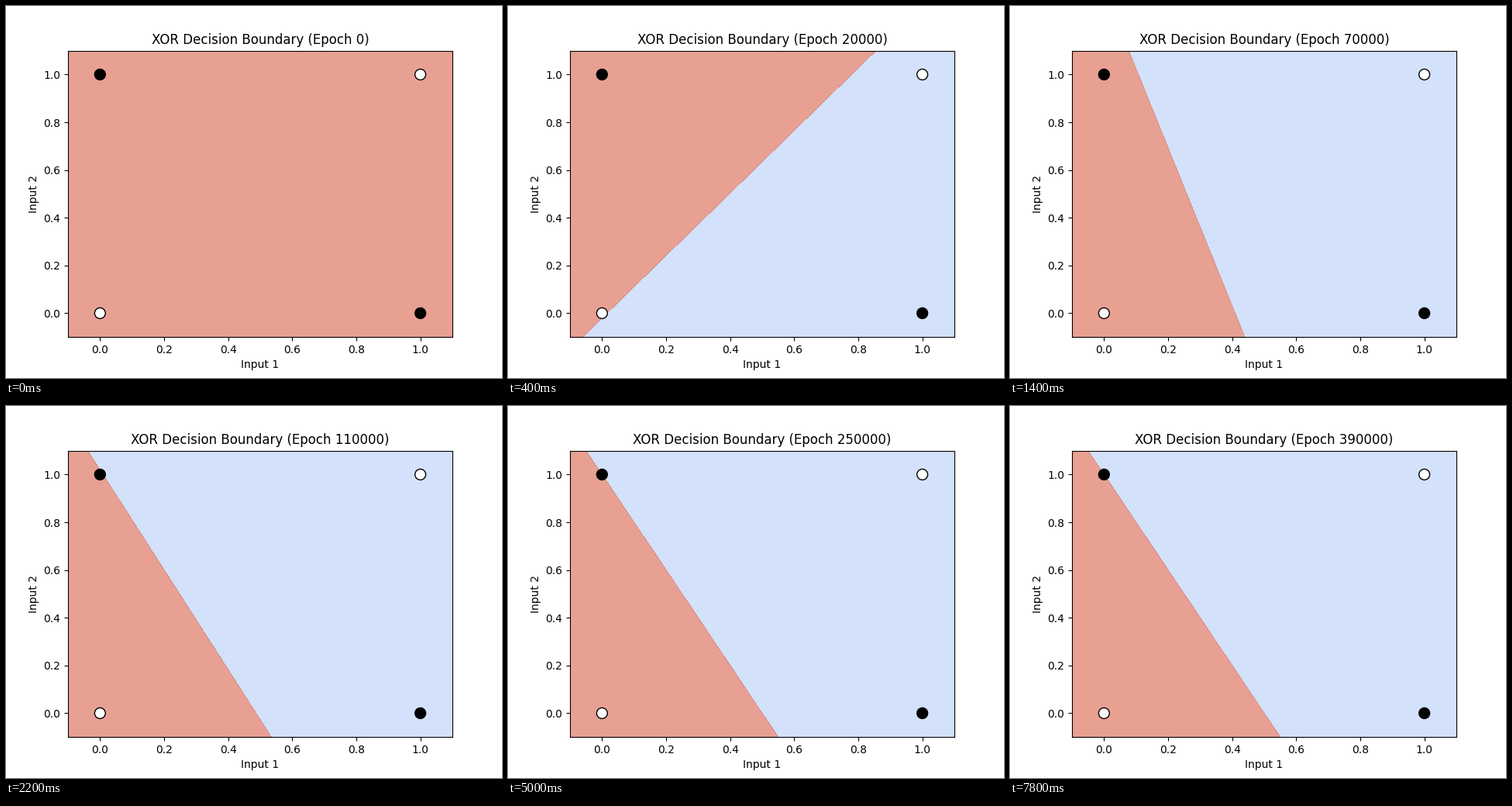
Animation, 640 px wide and 480 px high, one loop 8 s. Source, as a matplotlib script:

```python
import matplotlib.pyplot as plt
import numpy as np
from matplotlib.animation import FuncAnimation

FRAMES, STEP_MS, EPOCHS = 40, 200, 10000
LOW, HIGH = -0.1, 1.1
BLUE, RED = (183 / 255, 205 / 255, 248 / 255), (218 / 255, 97 / 255, 73 / 255)

# Decaying error modes of a single neuron, relative to its final weights
KNOTS = [0, 1, 2, 4, 7, 11, 40]
SLOW = [1.40, 1.07, 0.78, 0.355, 0.103, 0.0218, 3e-7]
SKEW = [14.3, 8.3, 4.8, 1.539, 0.249, 0.0221, 5e-10]

axis = np.linspace(LOW, HIGH, 100)
X, Y = np.meshgrid(axis, axis)

fig, ax = plt.subplots(figsize=(6.4, 4.8), dpi=100)


def mode(n, values):
    return np.exp(np.interp(n, KNOTS, np.log(values)))


def weights(n):
    slow, skew = -mode(n, SLOW), mode(n, SKEW)
    fast = -0.43 * np.exp(-3.86 * (n - 1))
    w1 = 2 + slow + skew + fast
    w2 = 1 + slow - skew + fast
    bias = -1 - 1.186 * slow + 1.685 * fast
    return w1, w2, bias


def draw(n):
    ax.clear()
    w1, w2, bias = weights(n)
    ax.contourf(X, Y, -(w1 * X + w2 * Y + bias), levels=[-1e3, 0, 1e3],
                colors=[BLUE, RED], alpha=0.6)
    ax.scatter([0, 0, 1, 1], [0, 1, 0, 1], s=100, zorder=3,
               c=["white", "black", "black", "white"],
               edgecolors="black", linewidths=1)
    ax.set(xlim=(LOW, HIGH), ylim=(LOW, HIGH),
           xlabel="Input 1", ylabel="Input 2",
           title=f"XOR Decision Boundary (Epoch {n * EPOCHS})")
    return ax.get_children()


anim = FuncAnimation(fig, draw, frames=FRAMES, init_func=lambda: draw(0),
                     interval=STEP_MS, repeat=True, repeat_delay=0)
plt.show()
```
